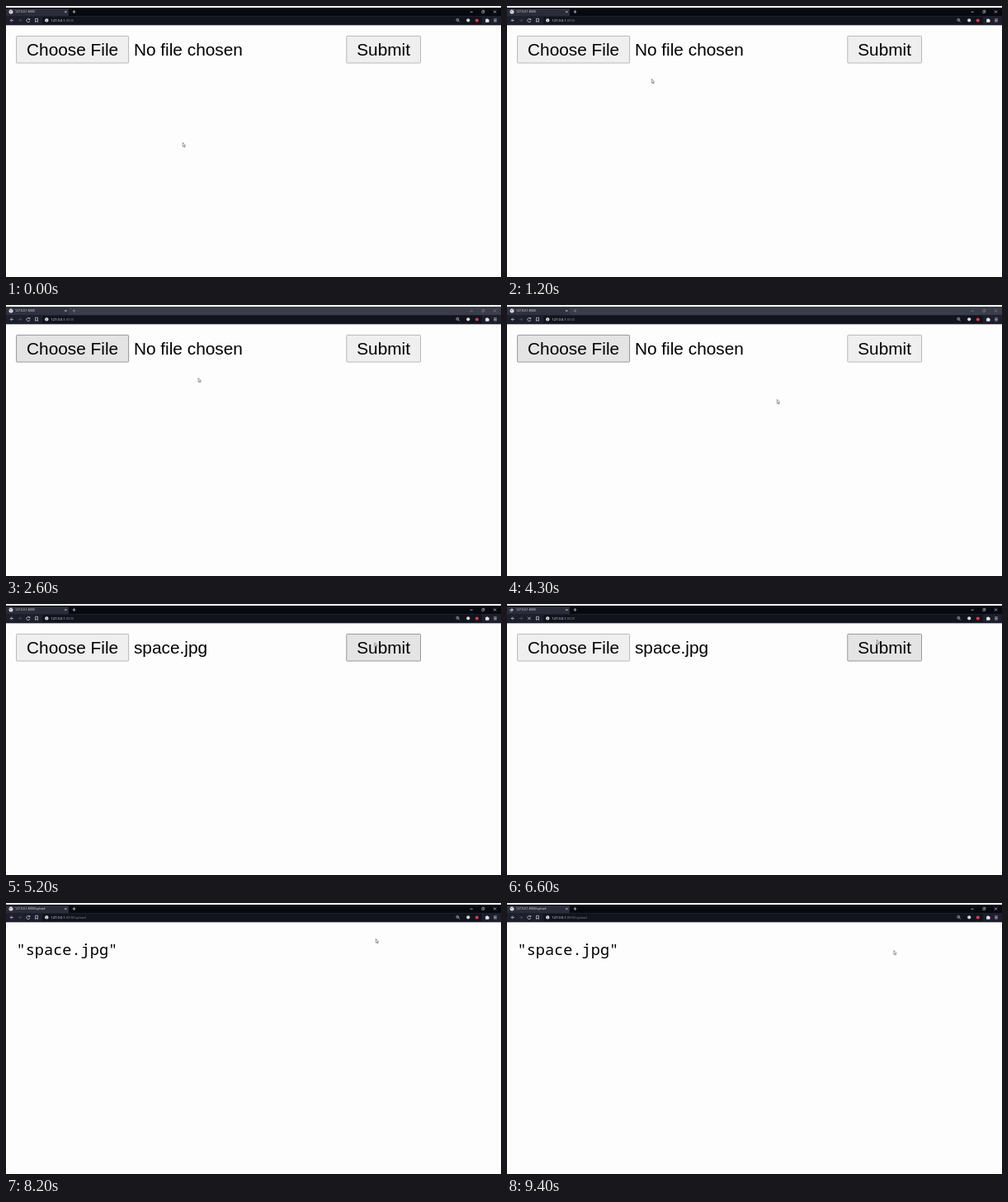
Write an HTML page that moves like this. It is 600x328 px and loops after 9500 ms.

```html
<!DOCTYPE html>
<html lang="en">
<head>
<meta charset="utf-8">
<title>File upload</title>
<style>
html, body { margin: 0; width: 100%; height: 100%; overflow: hidden; background: #fdfdfe; }
svg { display: block; width: 100%; height: 100%; }

.ui { font-family: "Open Sans", "Noto Sans", sans-serif; }
.title { font-size: 3.5px; fill: #e9eaee; }
.url { font-size: 4.1px; fill: #f2f3f5; }
.dim { fill: #7f838e; }
.form { font: 20.83px "Liberation Sans", Arial, sans-serif; fill: #000; }
.json { font: 18.6px "Noto Sans Mono", monospace; fill: #000; }
.icon { fill: none; stroke: #d6d8de; stroke-width: .7; }
.btn { fill: #efefef; stroke: #b2b2b2; stroke-width: .9; }

/* One shared 9.5 s timeline, stepped at ten pictures a second */
.anim { animation: 9.5s step-end -10ms infinite; }
.strip { animation-name: strip; fill: #070910; }
.tab { animation-name: tab; fill: #2a2d39; }
.controls { animation-name: controls; }
.choose { animation-name: choose; }
.submit { animation-name: submit; }
.empty { animation-name: empty; }
.named { animation-name: named; }
.idle { animation-name: idle; }
.busy { animation-name: busy; }
.old { animation-name: old; }
.new { animation-name: new; }
.shield { animation-name: shield; fill: #d9dbe0; }
.before { animation-name: before; }
.after { animation-name: after; }
.cursor { animation-name: cursor; }
.spin { animation: spin 1.9s steps(19) -10ms infinite; transform-origin: 6px 7px; }

/* window loses focus while the file dialog is open */
@keyframes strip { 0%, 47.37% { fill: #070910; } 22.11% { fill: #3b3e4a; } }
@keyframes tab { 0%, 47.37% { fill: #2a2d39; } 22.11% { fill: #30333f; } }
@keyframes controls { 0%, 47.37% { opacity: 1; } 22.11% { opacity: .45; } }

/* hover */
@keyframes choose {
  0%, 47.37% { fill: #efefef; stroke: #b2b2b2; }
  14.74% { fill: #e4e4e4; stroke: #8e8e8e; }
}
@keyframes submit {
  0% { fill: #efefef; stroke: #b2b2b2; }
  51.58%, 100% { fill: #e4e4e4; stroke: #8e8e8e; }
}

/* file name, loading, address, page */
@keyframes empty { 0% { opacity: 1; } 47.37%, 100% { opacity: 0; } }
@keyframes named { 0% { opacity: 0; } 47.37%, 100% { opacity: 1; } }
@keyframes idle { 0%, 84.21%, 100% { opacity: 1; } 58.95% { opacity: 0; } }
@keyframes busy { 0%, 84.21%, 100% { opacity: 0; } 58.95% { opacity: 1; } }
@keyframes old { 0% { opacity: 1; } 81.05%, 100% { opacity: 0; } }
@keyframes new { 0% { opacity: 0; } 81.05%, 100% { opacity: 1; } }
@keyframes shield { 0%, 84.21%, 100% { fill: #d9dbe0; } 81.05% { fill: #e8563a; } }
@keyframes before { 0% { opacity: 1; } 84.21%, 100% { opacity: 0; } }
@keyframes after { 0% { opacity: 0; } 84.21%, 100% { opacity: 1; } }

@keyframes spin { to { transform: rotate(-360deg); } }

@keyframes cursor {
  0% { transform: translate(214px, 165px); animation-timing-function: steps(6); }
  6.32% { transform: translate(245px, 150px); }
  8.42% { transform: translate(245px, 150px); animation-timing-function: steps(4); }
  12.63% { transform: translate(175px, 88px); animation-timing-function: steps(3); }
  15.79% { transform: translate(122px, 54px); animation-timing-function: steps(3); }
  18.95% { transform: translate(114px, 50.5px); }
  20% { transform: translate(114px, 50.5px); animation-timing-function: steps(4); }
  24.21% { transform: translate(205px, 91px); animation-timing-function: steps(3); }
  27.37% { transform: translate(232.7px, 88px); }
  31.58% { transform: translate(232.7px, 88px); animation-timing-function: steps(8); }
  40% { transform: translate(327px, 114px); }
  46.32% { transform: translate(327px, 114px); animation-timing-function: steps(6); }
  52.63% { transform: translate(441px, 50px); animation-timing-function: steps(2); }
  54.74% { transform: translate(446.5px, 46.5px); animation-timing-function: steps(2); }
  56.84% { transform: translate(448px, 43px); }
  92.63% { transform: translate(448px, 43px); animation-timing-function: steps(3); }
  95.79% { transform: translate(464px, 57px); }
  98.95%, 100% { transform: translate(468.5px, 57px); }
}
</style>
</head>
<body>
<svg viewBox="0 0 600 328" preserveAspectRatio="none">
  <rect width="600" height="328" fill="#fdfdfe"/>

  <g class="ui">
    <!-- tab strip -->
    <rect class="anim strip" y="2" width="600" height="11"/>
    <path class="anim tab" d="M0 13V4q0-1 1-1H75q1 0 1 1V13z"/>
    <g class="anim idle">
      <circle cx="6" cy="7" r="2.5" fill="#e4e6ea"/>
      <path d="M4.3 6.2l1.6.5.3 1.5M6.8 5l1 1.2" fill="none" stroke="#4a4e5a" stroke-width=".6"/>
    </g>
    <g class="anim busy">
      <circle cx="6" cy="7" r="1.6" fill="#b9bcc5"/>
      <path class="spin" d="M6 4.3a2.7 2.7 0 0 1 2.7 2.7" fill="none" stroke="#a8adba" stroke-width=".7"/>
    </g>
    <text class="title anim old" x="11" y="8.3">127.0.0.1:8000</text>
    <text class="title anim new" x="11" y="8.3">127.0.0.1:8000/upload</text>
    <path class="icon" d="M71.2 5.9l2.4 2.4m0-2.4l-2.4 2.4"/>
    <g class="anim controls icon">
      <path d="M82.5 5v4M80.5 7h4"/>
      <path d="M562.5 7.2h3.2M591 5.5l3 3m0-3l-3 3"/>
      <path d="M576.8 6.2h2.3v2.3h-2.3zM577.6 6.2v-.8h2.3v2.3h-.8" stroke-width=".5"/>
    </g>

    <!-- toolbar -->
    <rect y="12" width="600" height="11.3" fill="#1d202c"/>
    <rect x="44" y="13" width="533" height="9" rx="1" fill="#12141d"/>
    <g class="icon">
      <path d="M9 17.4H5.4m1.7-1.8l-1.8 1.8 1.8 1.8"/>
      <path d="M15 17.4h3.6m-1.7-1.8l1.8 1.8-1.8 1.8" stroke="#555a67"/>
      <path class="anim idle" d="M28.4 16.3a2 2 0 1 0 .4 1.7M28.8 15v1.6h-1.6"/>
      <path class="anim busy" d="M25.2 15.7l3.4 3.4m0-3.4l-3.4 3.4"/>
      <path d="M35.6 15.3h2.8v4.2L37 18.2l-1.4 1.3z"/>
    </g>
    <circle cx="49.3" cy="17.4" r="2.1" fill="#eceef1"/>
    <path d="M49.3 16v.5m0 .5v1.8" stroke="#12141d" stroke-width=".6"/>
    <text class="url anim old" x="54.3" y="18.9">127.0.0.1<tspan class="dim">:8000</tspan></text>
    <text class="url anim new" x="54.3" y="18.9">127.0.0.1<tspan class="dim">:8000/upload</tspan></text>
    <g class="icon">
      <circle cx="547.3" cy="16.8" r="1.5" stroke-width=".6"/>
      <path d="M548.4 18l1.4 1.5M546.6 16.8h1.4" stroke-width=".6"/>
    </g>
    <circle class="anim shield" cx="560.2" cy="17.3" r="2.1"/>
    <circle cx="570.8" cy="17.5" r="2" fill="#d9404a"/>
    <path d="M581.2 16h1.2a.8.8 0 0 1 1.6 0h1.2v1.2a.8.8 0 0 1 0 1.6v1h-4z" fill="#e3e5ea"/>
    <path class="icon" d="M591.2 15.9h3.6m-3.6 1.5h3.6m-3.6 1.5h3.6" stroke-width=".6"/>
  </g>

  <g class="anim before form">
    <rect class="btn anim choose" x="12.6" y="36.4" width="136" height="32.6" rx=".8"/>
    <text x="25" y="60">Choose File</text>
    <text class="anim empty" x="154.9" y="60">No file chosen</text>
    <text class="anim named" x="154.9" y="60">space.jpg</text>
    <rect class="btn anim submit" x="412.8" y="36.4" width="89.7" height="32.6" rx=".8"/>
    <text x="425.2" y="60">Submit</text>
  </g>
  <text class="anim after json" x="12.5" y="63">"space.jpg"</text>

  <path class="anim cursor" d="M.3.3V5.2L1.4 4.3 2.2 6 2.9 5.7 2.2 4H3.7z" fill="#fff" stroke="#3c3c40" stroke-width=".5"/>
</svg>
</body>
</html>
```
